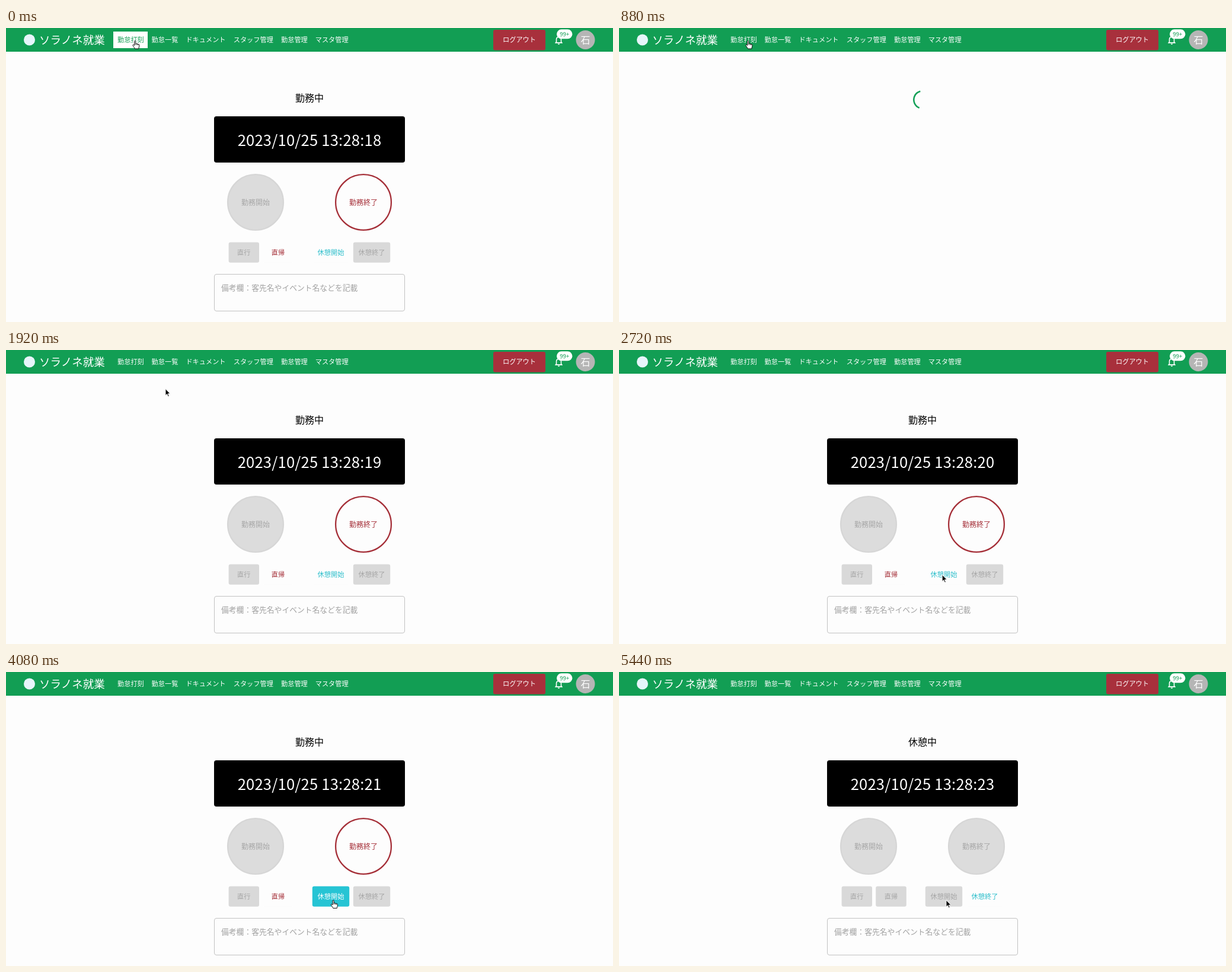
These frames come from a looping animation (1024x496 px, 5680 ms). An HTML page:

```html
<!DOCTYPE html>
<html lang="ja">
<head>
<meta charset="utf-8">
<title>勤怠打刻</title>
<style>
  html, body { margin: 0; width: 100%; height: 100%; overflow: hidden; background: #fdfdfd; }
  svg { display: block; width: 100vw; height: 100vh; }
  text { font: 500 11.2px "Noto Sans CJK JP", "Noto Sans CJK", "Noto Sans JP", sans-serif; white-space: pre; }
  .mid { text-anchor: middle; }
</style>
</head>
<body>
<svg viewBox="0 0 1024 496">
  <rect width="1024" height="496" fill="#fdfdfd"/>
  <rect width="1024" height="40" fill="#129e54"/>

  <g id="member">
    <circle cx="39.5" cy="20" r="9.5" fill="#e6f5fb"/>
    <text x="56" y="26.6" fill="#fff" style="font-size:18.5px">ソラノネ就業</text>
    <rect id="navHover" x="181" y="6" width="58" height="28" fill="#fff"/>
    <g id="nav" fill="#fff"></g>
    <rect x="822" y="3" width="88" height="34.5" rx="3" fill="#a8303c"/>
    <text class="mid" x="866" y="24.3" fill="#fff">ログアウト</text>
  </g>
  <g id="guest">
    <rect x="822" y="5" width="88" height="32.5" rx="3" fill="#0a7c40"/>
    <rect x="822" y="4" width="88" height="32.5" rx="3" fill="#fff"/>
    <text class="mid" x="866" y="24.3" fill="#129e54">ログイン</text>
    <text x="26.8" y="62" fill="#444" style="font-weight:400">-</text>
  </g>

  <path transform="translate(922.9 10.5) scale(.8)" fill="#fff" d="M12 22c1.1 0 2-.9 2-2h-4c0 1.1.9 2 2 2zm6-6v-5c0-3.07-1.63-5.64-4.5-6.32V4c0-.83-.67-1.5-1.5-1.5s-1.5.67-1.5 1.5v.68C7.64 5.36 6 7.92 6 11v5l-2 2v1h16v-1l-2-2zm-2 1H8v-6c0-2.48 1.51-4.5 4-4.5s4 2.02 4 4.5v6z"/>
  <rect x="929" y="2.3" width="26.4" height="16" rx="8" fill="#fff"/>
  <text class="mid" x="942.2" y="14" fill="#129e54" style="font-size:9.6px">99+</text>
  <circle cx="977.5" cy="20" r="16" fill="#b5b5b5"/>
  <text id="initial" class="mid" x="977.5" y="26" fill="#fff" style="font-size:16px;font-weight:400">石</text>
  <path id="person" transform="translate(965.5 8)" fill="#fff" d="M12 12c2.21 0 4-1.79 4-4s-1.79-4-4-4-4 1.79-4 4 1.79 4 4 4zm0 2c-2.67 0-8 1.34-8 4v2h16v-2c0-2.66-5.33-4-8-4z"/>

  <circle id="spinner" cx="512" cy="121" r="14.7" fill="none" stroke="#14a058" stroke-width="2.6"/>

  <g id="page">
    <text id="status" class="mid" x="512" y="123.6" style="font-size:16px"></text>
    <rect x="351" y="149" width="322" height="78" rx="4"/>
    <text id="clock" class="mid" x="512" y="199" fill="#fff" style="font-size:25.6px;font-weight:400;letter-spacing:.2px"></text>
    <g id="buttons"></g>
    <rect x="351.5" y="415.5" width="321" height="62" rx="3.5" fill="none" stroke="#c2c2c2"/>
    <text x="363" y="442.8" fill="#a2a2a2" style="font-size:12.8px;font-weight:400">備考欄：客先名やイベント名などを記載</text>
  </g>

  <g id="cursor" stroke-linejoin="round">
    <path id="arrow" fill="#000" stroke="#fff" stroke-width=".9" d="M0 0V11.2L2.6 8.8L4.4 13L6.2 12.2L4.4 8.2H8Z"/>
    <path id="hand" fill="#fff" stroke="#000" stroke-width=".95" d="M-1 1.2C-1-.4 1.2-.4 1.2 1.2V5L2 4.6C2.9 4.4 3.4 4.9 3.6 5.4C4.6 5 5.3 5.4 5.6 6.1C6.8 5.8 7.5 6.5 7.4 7.6C7.4 10 6.5 11 6.3 13.5H-.2C-.6 11.8-2.6 9.8-3.6 8C-4 7-2.9 6.3-2 7L-1 8ZM1.2 5V7.2M3.6 5.4V7.4M5.6 6.1V7.6"/>
  </g>
</svg>
<script>
const $ = id => document.getElementById(id);
const LOOP = 5680, STEP = 80, LAST = 5440;
const T = { reload: 240, login: 560, spin: 530, loaded: 1680, hover: 2740, rest: 4362 };

const RED = [165, 47, 56], CYAN = [38, 196, 212], TEAL = [44, 190, 203];
const PAPER = [253, 253, 253], GREY = [217, 217, 217], DISC = [220, 220, 220];
const RIM = [214, 214, 214], MUTED = [166, 166, 166], WHITE = [255, 255, 255];

// [time, x, y] of the pointer tip
const PATH = [[0, 217.5, 21.5], [1680, 217.5, 21.5], [1920, 269, 65.5],
  [2240, 420, 236], [2480, 518, 346], [2800, 547, 381.5], [3440, 547, 381.5], [3840, 552, 385]];

function add(parent, tag, attrs, text) {
  const el = document.createElementNS('http://www.w3.org/2000/svg', tag);
  for (const k in attrs) el.setAttribute(k, attrs[k]);
  if (text) el.textContent = text;
  return parent.appendChild(el);
}

const clamp = v => Math.max(0, Math.min(1, v));
const mix = (a, b, p) => `rgb(${a.map((v, i) => Math.round(v + (b[i] - v) * p))})`;
const show = (id, on) => { $(id).style.display = on ? '' : 'none'; };

function bezier(x1, y1, x2, y2) {
  const at = (a, b, u) => 3 * a * u * (1 - u) ** 2 + 3 * b * u * u * (1 - u) + u ** 3;
  return x => {
    let lo = 0, hi = 1;
    for (let i = 0; i < 24; i++) {
      const m = (lo + hi) / 2;
      if (at(x1, x2, m) < x) lo = m; else hi = m;
    }
    return at(y1, y2, lo);
  };
}
const smooth = bezier(.4, 0, .2, 1), inOut = bezier(.42, 0, .58, 1);
const fade = (t, start, ms = 250) => smooth(clamp((t - start) / ms));

const nav = [[188, '勤怠打刻'], [245.6, '勤怠一覧'], [303.4, 'ドキュメント'],
  [383.7, 'スタッフ管理'], [464, '勤怠管理'], [521.7, 'マスタ管理']]
  .map(([x, s]) => add($('nav'), 'text', { x, y: 24.2 }, s));

function disc(cx, label) {
  return {
    box: add($('buttons'), 'circle', { cx, cy: 294, r: 46.9, 'stroke-width': 2.3 }),
    text: add($('buttons'), 'text', { class: 'mid', x: cx, y: 299, style: 'font-size:12px' }, label)
  };
}
function chip(x, width, label) {
  return {
    box: add($('buttons'), 'rect', { x, y: 361.6, width, height: 34.2, rx: 3 }),
    text: add($('buttons'), 'text', { class: 'mid', x: x + width / 2, y: 383.2 }, label)
  };
}
function paint(b, fill, ink, rim) {
  b.box.setAttribute('fill', fill);
  b.text.setAttribute('fill', ink);
  if (rim) b.box.setAttribute('stroke', rim);
}
const start = disc(421, '勤務開始'), finish = disc(603, '勤務終了');
const goOut = chip(375.6, 51.4, '直行'), goHome = chip(433.2, 51.6, '直帰');
const restOn = chip(516.8, 62.4, '休憩開始'), restOff = chip(585.8, 62.4, '休憩終了');
paint(start, mix(DISC, DISC, 0), mix(MUTED, MUTED, 0), mix(RIM, RIM, 0));
paint(goOut, mix(GREY, GREY, 0), mix(MUTED, MUTED, 0));

function drawSpinner(t) {
  const p = ((t - T.spin + 1400) % 1400) / 1400;
  const first = p < .5, e = inOut(first ? p * 2 : p * 2 - 1);
  const from = first ? 15 * e : 15 + 110 * e;
  const len = Math.min(first ? 1 + 99 * e : 100, 126.92 - from);
  const k = 32 / 44;
  $('spinner').setAttribute('stroke-dasharray', `${len * k} 200`);
  $('spinner').setAttribute('transform', `rotate(${360 * p + from / 126.92 * 360} 512 121)`);
}

function drawPage(t) {
  const resting = t >= T.rest, hovered = t >= T.hover;
  const p = fade(t, T.rest), ink = fade(t, T.rest, 340);
  const second = t < T.reload ? 18 : 19 + Math.floor((t - 1400) / 1000);
  $('clock').textContent = '2023/10/25 13:28:' + second;
  $('status').textContent = resting ? '休憩中' : '勤務中';
  paint(finish, mix(PAPER, DISC, p), mix(RED, MUTED, ink), mix(RED, RIM, p));
  paint(goHome, mix(PAPER, GREY, p), mix(RED, MUTED, ink));
  paint(restOn, resting ? mix(CYAN, GREY, p) : mix(PAPER, CYAN, fade(t, T.hover)),
    resting ? mix(MUTED, MUTED, 0) : hovered ? mix(WHITE, WHITE, 0) : mix(TEAL, TEAL, 0));
  paint(restOff, mix(GREY, PAPER, p), resting ? mix(TEAL, TEAL, 0) : mix(MUTED, MUTED, 0));
}

function drawCursor(t) {
  let i = 0;
  while (i < PATH.length - 2 && t >= PATH[i + 1][0]) i++;
  const [t0, x0, y0] = PATH[i], [t1, x1, y1] = PATH[i + 1];
  let p = clamp((t - t0) / (t1 - t0));
  if (t1 === 1920) p *= p;
  if (t1 === 2800) p = 1 - (1 - p) ** 2;
  $('cursor').setAttribute('transform', `translate(${x0 + (x1 - x0) * p} ${y0 + (y1 - y0) * p})`);
  const hand = t <= 1680 || (t >= T.hover && t < T.rest);
  show('hand', hand);
  show('arrow', !hand);
}

function render(t) {
  const guest = t >= T.reload && t < T.login;
  const loading = t >= T.login && t < T.loaded;
  const hot = t < T.reload;
  show('guest', guest);
  show('person', guest);
  show('member', !guest);
  show('initial', !guest);
  show('navHover', hot);
  nav[0].setAttribute('fill', hot ? '#129e54' : '#fff');
  show('spinner', loading);
  show('page', !guest && !loading);
  drawSpinner(t);
  drawPage(t);
  drawCursor(t);
}

const begin = performance.now();
function tick() {
  const t = (performance.now() - begin) % LOOP;
  render(Math.min(LAST, Math.floor(t / STEP) * STEP));
  requestAnimationFrame(tick);
}
tick();
</script>
</body>
</html>
```
